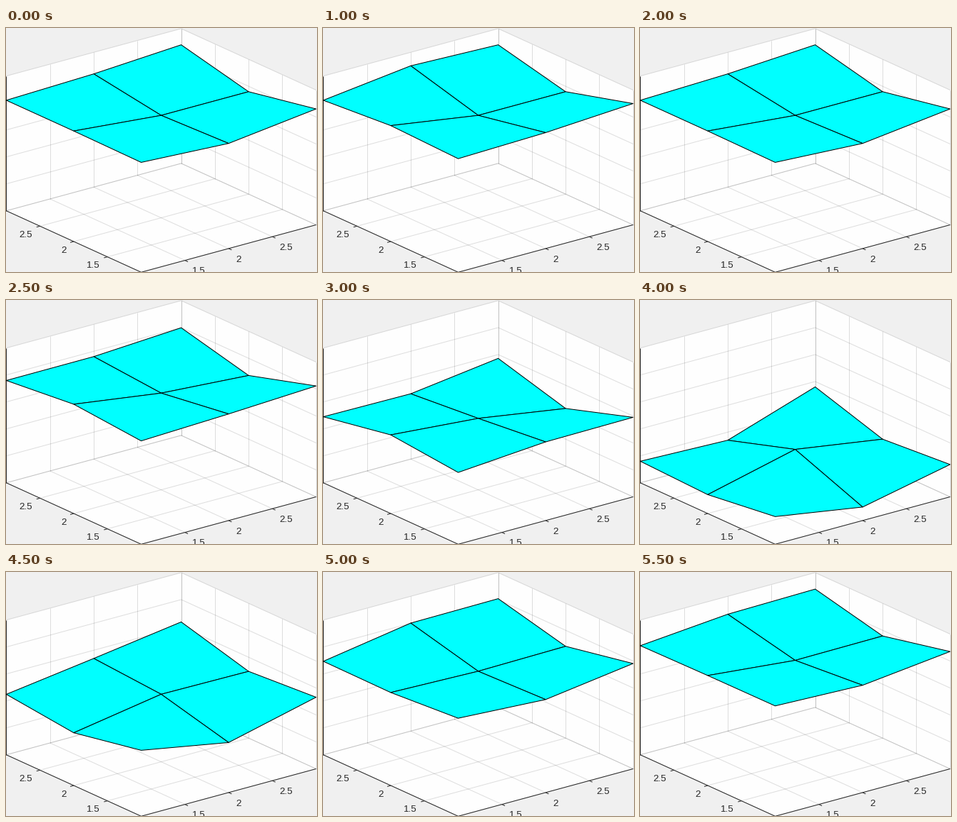
A matplotlib script for the animation above (6000 ms loop, 436 by 344 pixels).

```python
import numpy as np
import matplotlib.pyplot as plt
from matplotlib.animation import FuncAnimation
from matplotlib.patches import Polygon

W, H, DPI = 436, 344, 96
PX = 72 / DPI
INK = "#262626"
FRAMES = 12
Z_MAX, Z_STEP = 50, 10

# Orthographic projection: front corner plus one screen vector per axis.
FRONT = np.array([189.5, 344.3])
U = np.array([122.6, -33.4])
V = np.array([-94.55, -43.3])
Z = np.array([0.0, -3.8])

# Grid node (u, v): height at rest, height when pressed, sway.
NODES = {
    (0, 2): (41, 8, 0),
    (1, 2): (43.5, 8.5, 1.5),
    (2, 2): (44, 18, 0),
    (0, 1): (42, 8, 1),
    (1, 1): (38, 15, 0),
    (2, 1): (38, 10, 0),
    (1, 0): (41, 7, 2),
    (2, 0): (44, 13, 1),
}
CELLS = [(1, 1), (0, 1), (1, 0), (0, 0)]  # back to front


def project(u, v, z=0):
    return FRONT + u * U + v * V + z * Z


def line(a, b, color=INK, alpha=1.0):
    ax.plot(*zip(a, b), color=color, alpha=alpha, lw=PX,
            solid_capstyle="butt")


def grid(a, b):
    line(project(*a), project(*b), alpha=0.15)


def draw_box():
    outline = [(0, 0, 0), (2, 0, 0), (2, 0, Z_MAX), (2, 2, Z_MAX),
               (0, 2, Z_MAX), (0, 2, 0)]
    ax.add_patch(Polygon([project(*p) for p in outline], fc="#fefefe", lw=0))
    for t in np.arange(0, 2.1, 0.5):
        grid((t, 0), (t, 2))
        grid((0, t), (2, t))
        grid((t, 2, 0), (t, 2, Z_MAX))
        grid((2, t, 0), (2, t, Z_MAX))
    for z in range(0, Z_MAX + 1, Z_STEP):
        grid((0, 2, z), (2, 2, z))
        grid((2, 0, z), (2, 2, z))
    for end in [(2, 0), (0, 2)]:
        line(project(0, 0), project(*end))
    line(project(0, 2), project(0, 2, Z_MAX))


def draw_ticks():
    font = dict(family="Liberation Sans", size=10, color=INK, va="baseline")
    for t in (0.5, 1, 1.5):
        label = f"{1 + t:g}"
        p, q = project(t, 0), project(0, t)
        line(p, p - 0.045 * V)
        line(q, q - 0.04 * U)
        ax.text(p[0] + 10, p[1] + 18.7, label, ha="left", **font)
        ax.text(q[0] - 10.5, q[1] + 15.7, label, ha="right", **font)


def press(t):
    """Smooth fall to 1, a short hold, then an eased return to 0."""
    fall = np.clip((t - 4.4) / 3.2, 0, 1)
    rise = np.clip((t - 8.2) / 3.2, 0, 1)
    return fall**2 * (3 - 2 * fall) * (1 - rise)**2


def node_height(node, t):
    rest, low, sway = NODES[node]
    lag = 0.2 * np.sign(2 - sum(node))  # the back moves before the front
    return rest + (low - rest) * press(t - lag) - sway * np.cos(np.pi * t / 2)


def update(frame):
    z = {node: node_height(node, frame) for node in NODES}
    z[0, 0] = np.mean(list(z.values()))
    for patch, (u, v) in zip(patches, CELLS):
        corners = [(u, v), (u + 1, v), (u + 1, v + 1), (u, v + 1)]
        patch.set_xy([project(*c, z[c]) for c in corners])
    return patches


fig = plt.figure(figsize=(W / DPI, H / DPI), dpi=DPI, facecolor="#f0f0f0")
ax = fig.add_axes([0, 0, 1, 1])
ax.axis("off")
draw_box()
draw_ticks()
patches = [ax.add_patch(Polygon(np.zeros((4, 2)), fc="cyan", ec="black",
                                lw=PX, joinstyle="round", zorder=5))
           for _ in CELLS]
ax.set(xlim=(0, W), ylim=(H, 0))

anim = FuncAnimation(fig, update, frames=FRAMES, interval=500,
                     repeat=True, repeat_delay=0)
plt.show()
```
